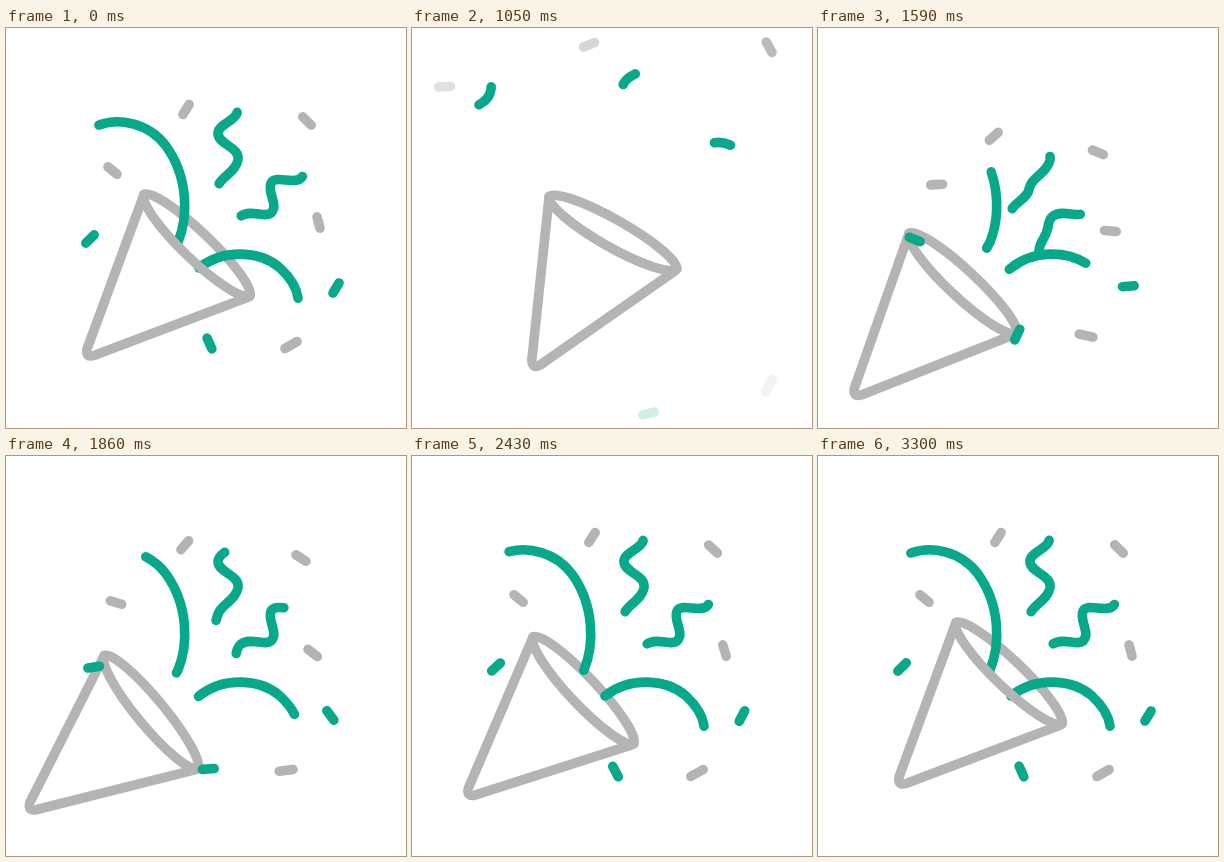
An HTML page that plays this animation: 400x400 px, repeating every 5330 ms.

```html
<!DOCTYPE html>
<html lang="en">
<head>
<meta charset="utf-8">
<title>Party popper</title>
<style>
  html, body { margin: 0; width: 100%; height: 100%; overflow: hidden; background: #fff; }
  svg { display: block; width: 100%; height: 100%; }
  svg * { fill: none; stroke-width: 9.6; stroke-linecap: round; stroke-linejoin: round; }
  .gray { stroke: #b4b4b4; }
  .green { stroke: #08a88a; }
</style>
</head>
<body>
<svg viewBox="0 0 400 400">
  <path class="gray cone" d="M138 166.5A73.5 14 43.8 0 1 244 268"/>
  <g id="ribbons"></g>
  <path class="gray cone" d="M244 268A73.5 15 43.8 0 1 138 166.5L81 321Q79.5 330 88 327.5L242 269.3"/>
  <g id="confetti"></g>
</svg>
<script>
const LOOP = 5330, STEP = 30, BURST = 1110, SETTLE = 2600;

const clamp = x => Math.max(0, Math.min(1, x));
const mix = (a, b, p) => a + (b - a) * p;
const smooth = x => x * x * (3 - 2 * x);
const easeOut = (x, power) => 1 - (1 - clamp(x)) ** power;
const span = (t, from, to) => clamp((t - from) / (to - from));

// Eases through [time, value] keys, resting at each one.
function glide(t, keys) {
  let value = keys[0][1];
  for (let i = 1; i < keys.length; i++)
    value = mix(value, keys[i][1], smooth(span(t, keys[i - 1][0], keys[i][0])));
  return value;
}

function add(parent, color, d) {
  const el = document.createElementNS("http://www.w3.org/2000/svg", "path");
  el.setAttribute("class", color);
  el.setAttribute("d", d);
  return document.getElementById(parent).appendChild(el);
}

// Cone: tilts up, then recoils down-left and swings back.
const cone = document.querySelectorAll(".cone");

function drawCone(t) {
  const x = glide(t, [[BURST, 0], [1440, -48], [3100, 0]]);
  const y = glide(t, [[BURST, 0], [1500, 39], [3100, 0]]);
  const tilt = glide(t, [[0, 0], [1180, -14.7], [1860, 6.6], [2920, 0]]);
  cone.forEach(el => el.setAttribute("transform", `translate(${x} ${y}) rotate(${tilt} 146 171)`));
}

// Ribbons: each path runs from the cone, through its resting part, to where it vanishes.
const ribbons = [
  {
    before: "M166 225L172 214",
    rest: "C182 190 183 150 160 118C142 94 112 90 93 97",
    after: "C78 101 55 105 35 87C14 68 26 38 52 37S80 52 79 61S70 76 64 78L40 84",
    power: 1.43, gone: 1157, start: 1343, end: 3138
  },
  {
    before: "M188 244L193 240",
    rest: "C218 220 255 223 274 240C287 252 291 262 292 270",
    after: "C296 300 291 322 277 335S245 368 210 372",
    power: 1.25, gone: 1000, start: 1275, end: SETTLE
  },
  {
    before: "M168 232Q178 215 193 209C209 203 206 194 196 187C186 179 210 172 211 161Q212 158 213 156",
    rest: "C216 149 230 143 232 132C234 119 213 117 212 106C211 97 229 93 231 85",
    after: "C233 74 211 68 211 57Q213 51 223 46l9 -5",
    power: 2.57, gone: 1130, start: 1241, end: SETTLE
  },
  {
    before: "M152 262Q172 246 192 241C206 244 222 245 221 228C220 212 228 212 230 199Q231 191 235 188",
    rest: "C245 181 259 190 265 185C273 177 261 165 265 155C270 146 289 158 296 149",
    after: "C304 138 290 128 301 115Q309 113 318 117l10 4",
    power: 2.57, gone: 1130, start: 1241, end: SETTLE
  }
];
ribbons.forEach(r => {
  r.el = add("ribbons", "green", r.before);
  r.tail = r.el.getTotalLength();
  r.el.setAttribute("d", r.before + r.rest);
  r.head = r.el.getTotalLength();
  r.el.setAttribute("d", r.before + r.rest + r.after);
  r.total = r.el.getTotalLength();
});

function drawRibbon(r, t) {
  let tail, head;
  if (t < BURST) {
    const p = span(t, 0, r.gone) ** r.power;
    tail = mix(r.tail, r.total, p);
    head = mix(r.head, r.total, p);
  } else {
    const p = easeOut(span(t, r.start, r.end), 4);
    tail = r.tail * p;
    head = r.head * p;
  }
  r.el.setAttribute("stroke-dasharray", `${head - tail} 9999`);
  r.el.setAttribute("stroke-dashoffset", -tail);
  r.el.setAttribute("visibility", head - tail > 0.5 ? "visible" : "hidden");
}

// Confetti: three poses (x, y, angle) per piece; it fades at the end of its life.
const LAUNCH = 1140, FADE = 380, SPIN = 1050;
const pieces = [
  { launch: [159.5, 204, -50], rest: [106.5, 142.5, 40], exit: [32.5, 58.5, 176], life: 1200 },
  { launch: [161.5, 198.5, 156], rest: [180, 81.5, 122], exit: [177, 16.5, 338], life: 1260 },
  { launch: [209, 230, 0], rest: [301, 93, 44], exit: [358, 18, -119], life: 1400 },
  { launch: [224.5, 231.5, -71], rest: [312.5, 194.5, 75], exit: [381.5, 144.5, 335], life: 950 },
  { launch: [211, 276, 59], rest: [285, 317, -30], exit: [357, 357.5, -242], life: 1110, half: 7 },
  { launch: [139.5, 213, 95], rest: [84, 211, -45], exit: [9, 285, -163], life: 780, color: "green" },
  { launch: [185, 276.5, -207], rest: [203.5, 315.5, 66], exit: [236.5, 385.5, 166], life: 1120, color: "green" },
  { launch: [244, 252, -142], rest: [330, 260, 121], exit: [391, 253.5, 296], life: 900, color: "green" }
];

function addPiece({ color = "gray", half = 5.9 }) {
  return add("confetti", color, `M${-half} 0H${half}`);
}
pieces.forEach(p => p.old = addPiece(p));
pieces.forEach(p => p.fresh = addPiece(p));

function place(el, a, b, move, spin, opacity) {
  const x = mix(a[0], b[0], move), y = mix(a[1], b[1], move);
  el.setAttribute("transform", `translate(${x} ${y}) rotate(${mix(a[2], b[2], spin)})`);
  el.setAttribute("opacity", opacity);
}

function drawPiece(p, t) {
  place(p.old, p.rest, p.exit, easeOut(t / p.life, 3), (t / SPIN) ** 1.5, clamp((p.life - t) / FADE));
  const x = span(t, LAUNCH, SETTLE);
  place(p.fresh, p.launch, p.rest, easeOut(x, 4), easeOut(x, 2), t < LAUNCH ? 0 : 1);
}

function draw(t) {
  drawCone(t);
  ribbons.forEach(r => drawRibbon(r, t));
  pieces.forEach(p => drawPiece(p, t));
}

const start = performance.now();
function tick() {
  const t = (performance.now() - start) % LOOP;
  draw(Math.floor(t / STEP) * STEP);
  requestAnimationFrame(tick);
}
tick();
</script>
</body>
</html>
```
